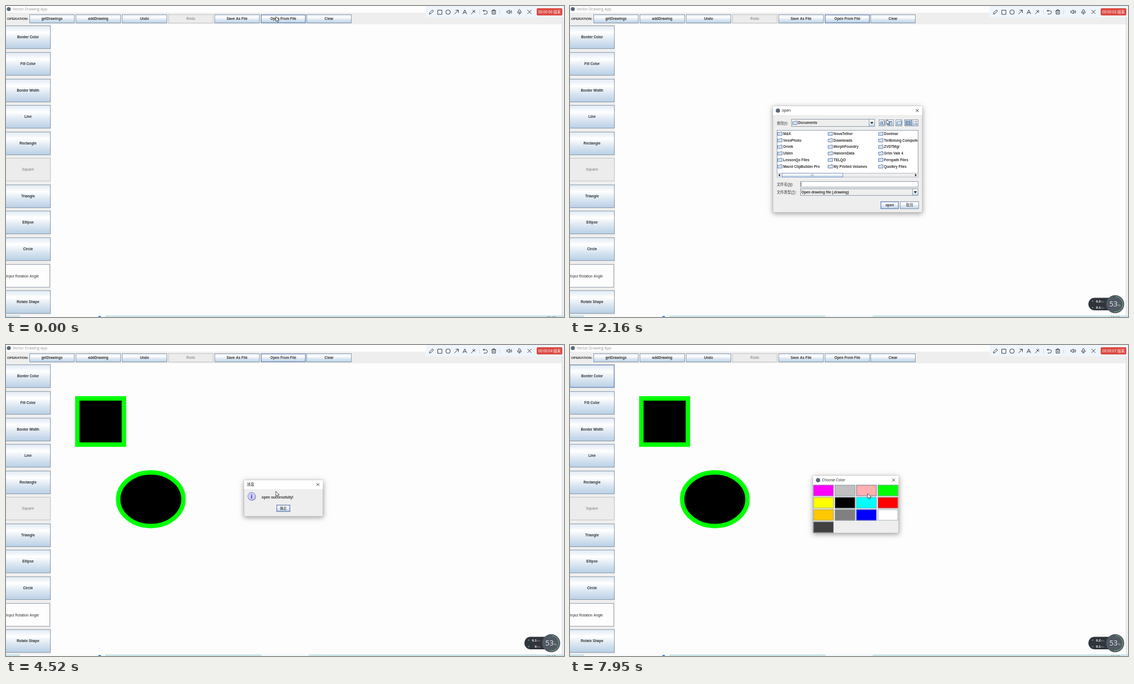
These frames come from a looping animation (1001 by 559 pixels, 8 s). An HTML page with a canvas:

```html
<!DOCTYPE html>
<html lang="en">
<head>
<meta charset="utf-8">
<title>Vector Drawing App</title>
<style>
html, body { margin: 0; width: 100%; height: 100%; overflow: hidden; background: #fdfdfd; }
canvas { display: block; }
</style>
</head>
<body>
<canvas id="stage" width="1001" height="559"></canvas>
<script>
const g = document.getElementById('stage').getContext('2d');
const LOOP = 8000;
const SANS = '"Liberation Sans","Noto Sans CJK SC","Noto Sans CJK",sans-serif';
const UI = '"Open Sans","Noto Sans CJK SC","Noto Sans CJK",sans-serif';
const PANEL = '#eeeeee', EDGE = '#7a8a99', BLUE = '#6382bf', INK = '#333';

const DOCUMENTS = [
  ['M&K', 'VexoPhoto', 'Orvek', 'Ublen', 'LessonQo Files', 'Mavol ClipBuilder Pro'],
  ['NovaTether', 'Downloads', 'MorphFoundry', 'HalvornData', 'TELQO', 'My Printed Volumes'],
  ['Dovimar', 'TerBolung Compute', 'ZVDTMgr', 'Grim Vale 4', 'Fernpath Files', 'Quolbry Files']
];
const DESKTOP = [
  ['KVT云盘', 'NubTrunk', 'felvo', '此电脑', '库', '网络', '00000'],
  ['mygitrepo - 快捷方式', '文档', '20231126095810.drawing', '20231126100347.drawing']
];
const SWATCHES = ['#f0f', '#c0c0c0', '#ffafaf', '#0f0', '#ff0', '#000', '#0ff',
  '#f00', '#ffc800', '#808080', '#00f', '#fff', '#404040'];

// Pointer path: time, x, y
const POINTER = [
  [0, 484, 19], [1750, 484, 19], [2150, 568, 204], [2350, 570, 206], [2640, 571, 206],
  [3260, 500, 284], [3480, 498, 265], [3620, 484, 263], [4720, 484, 263], [5000, 496, 290],
  [5250, 496, 290], [5600, 340, 222], [5840, 159, 138], [6020, 159, 138], [6400, 42, 55],
  [6950, 42, 55], [7640, 577, 256], [7720, 574, 258], [7940, 534, 267], [8000, 534, 267]
];
const SECONDS = [1000, 2000, 3340, 4300, 5000, 5700, 6700];
const SPEEDS = [[0, '0.1', '0.1'], [2000, '0.2', '0.1'], [3100, '0.1', '0.3'],
  [3760, '0.1', '0'], [5000, '0.2', '0.1']];

const clamp = v => Math.max(0, Math.min(1, v));
const easeOut = v => 1 - (1 - v) ** 2;

function rect(x, y, w, h, fill, edge) {
  g.fillStyle = fill;
  g.fillRect(x, y, w, h);
  if (edge) {
    g.strokeStyle = edge;
    g.lineWidth = .8;
    g.strokeRect(x + .5, y + .5, w - 1, h - 1);
  }
}

function text(s, x, y, { size = 6.35, bold = true, font = SANS, color = INK, align = 'left' } = {}) {
  g.font = `${bold ? 'bold ' : ''}${size}px ${font}`;
  g.fillStyle = color;
  g.textAlign = align;
  g.fillText(s, x, y);
}

function disc(x, y, r, fill) {
  g.beginPath();
  g.arc(x, y, r, 0, 7);
  g.fillStyle = fill;
  g.fill();
}

function line(d, color = '#333', width = 1) {
  g.strokeStyle = color;
  g.lineWidth = width;
  g.stroke(new Path2D(d));
}

function shape(d, color) {
  g.fillStyle = color;
  g.fill(new Path2D(d));
}

function metal(y, h) {
  const grad = g.createLinearGradient(0, y, 0, y + h);
  [[0, '#dde8f3'], [.3, '#fff'], [.6, '#dde8f3'], [1, '#b8cfe5']]
    .forEach(([at, color]) => grad.addColorStop(at, color));
  return grad;
}

function button(label, x, y, w, h, { off, hot, focus, bold = true } = {}) {
  rect(x, y, w, h, off ? '#ececec' : metal(y, h), off ? '#bcbcbc' : EDGE);
  if (hot) {
    g.strokeStyle = BLUE;
    g.strokeRect(x + 1, y + 1, w - 2, h - 2);
  }
  const mid = x + w / 2;
  text(label, mid, y + h / 2 + 2.3, { color: off ? '#999' : INK, align: 'center', bold });
  if (focus) {
    const half = g.measureText(label).width / 2 + 1;
    g.strokeStyle = '#a9bdd6';
    g.lineWidth = .6;
    g.strokeRect(mid - half, y + 4, half * 2, h - 8);
  }
}

function mainWindow(t) {
  const active = t >= 5250 && t < 6550;
  rect(0, 0, 1001, 559, '#fdfdfd');
  disc(5, 5.5, 3.6, '#596675');
  text('Vector Drawing App', 12, 8.3, { size: 6.75, bold: false, font: UI, color: active ? '#111' : '#999' });
  rect(0, 12, 998, 21, PANEL);
  rect(0, 33, 81, 523, PANEL);
  text('OPERATION:', 2, 25, { size: 6.2 });

  ['getDrawings', 'addDrawing', 'Undo', 'Redo', 'Save As File', 'Open From File', 'Clear']
    .forEach((label, i) => button(label, Math.round(42 + i * 82.9), 15, 81, 16, {
      off: i === 3, hot: i === 5 && t < 5250, focus: i === 5 && active
    }));

  ['Border Color', 'Fill Color', 'Border Width', 'Line', 'Rectangle', 'Square', 'Triangle',
    'Ellipse', 'Circle', '', 'Rotate Shape'].forEach((label, i) => {
    const y = Math.round(35.4 + i * 47.57);
    if (label) button(label, -1, y, 81, 42, { off: i === 5, hot: i === 0 && t > 6350 });
    else {
      rect(-1, y, 80, 42, '#fdfdfd', EDGE);
      text('Input Rotation Angle', 0, y + 23.5, { size: 6.5, bold: false });
    }
  });

  rect(997, 20, 1, 536, '#d4d9df');
  rect(998, 20, 3, 536, '#eef0f3');
  rect(0, 556, 1001, 3, '#cce6ea');
  rect(25, 556, 153, 3, '#fafcfc');
  if (t >= 1000) rect(458, 556, 85, 3, '#f0f7f8');
  disc(168, 560, 3, '#2583d8');
  text('10:10', 970, 563, { size: 6.5, bold: false });
}

function drawing() {
  g.strokeStyle = '#0f0';
  g.fillStyle = '#000';
  g.lineWidth = 8;
  g.beginPath();
  g.rect(128, 96, 83.5, 83);
  g.fill();
  g.stroke();
  g.beginPath();
  g.ellipse(259.8, 277.2, 58.6, 48.2, 0, 0, 7);
  g.fill();
  g.stroke();
}

function recorder(t) {
  rect(753, 0, 248, 20.5, '#eff5fc');
  [
    'M759.5 14.5l.7-2.7 4.8-4.8 2 2-4.8 4.8z', 'M774.5 7.5h7.5v7.5h-7.5z',
    'M789 11a4 4 0 1 0 8 0a4 4 0 1 0-8 0', 'M804.5 14.5l7-7M806.5 7.5h5v5',
    'M819.5 14.5l3.5-7.5l3.5 7.5M820.8 12h4.4', 'M834.5 14.5l5.5-5.5M836.5 8l5 4M839 7l3 2.5',
    'M856 8.5h4.5a3 3 0 0 1 0 6h-3.5M858 6.5l-2 2l2 2',
    'M871 8.5h8M873.5 8.3v-1.5h3v1.5M872 8.5v6h6v-6M874 10.5v2.2M876 10.5v2.2',
    'M898.5 9h2l2.5-2v7l-2.5-2h-2zM904.5 9q1.3 1.5 0 3.2M906 7.5q2.5 3 0 6',
    'M919.3 7.5q1.7-2.5 3.4 0v3q-1.7 2.5-3.4 0zM917.3 10q0 3.5 3.7 3.5t3.7-3.5M921 13.5v2',
    'M935.5 7l7 7M942.5 7l-7 7'
  ].forEach(d => line(d, '#303338', .95));
  line('M849.5 7v8M885.5 7v8', '#cbd2dc', .8);
  g.beginPath();
  g.roundRect(952, 4, 46, 13, 2);
  g.fillStyle = '#dc4b43';
  g.fill();
  const sec = SECONDS.filter(s => t >= s).length;
  text(`00:00:0${sec} 结束`, 975, 13, { size: 6.5, bold: false, color: '#fff', align: 'center' });
}

function monitor(t) {
  const [, up, down] = SPEEDS.filter(s => t >= s[0]).pop();
  g.beginPath();
  g.roundRect(930, 524.5, 50, 22.5, 11);
  g.fillStyle = '#30343b';
  g.fill();
  [[up, 530.5, '#5fa8d8'], [down, 542, '#56b884']].forEach(([value, y, color]) => {
    disc(937.5, y, 1.1, color);
    text(value, 952, y + 2.3, { size: 6.2, color: '#fff', align: 'right' });
    text('K/s', 952.5, y + 2, { size: 4.2, bold: false, color: '#a2a8af' });
  });
  disc(978, 536, 16.2, '#515963');
  g.beginPath();
  g.arc(978, 536, 13.8, -1.5, 1.75);
  g.strokeStyle = '#69b98b';
  g.lineWidth = 1;
  g.stroke();
  text(t < 2000 ? '52' : '53', 967.5, 540.2, { size: 13, bold: false, font: UI, color: '#e9edf0' });
  text('%', 983, 540, { size: 5, bold: false, color: '#c0c7cd' });
}

// A window that zooms and fades in, then out.
function popup(t, from, to, [x, y, w, h], title, icon, body) {
  if (t < from || t > to + 130) return;
  const shown = easeOut(clamp((t - from) / 200)) * (1 - clamp((t - to) / 130));
  const cx = x + w / 2, cy = y + h / 2, scale = .96 + .04 * shown;
  g.save();
  g.globalAlpha = shown;
  g.translate(cx, cy);
  g.scale(scale, scale);
  g.translate(-cx, -cy);
  g.shadowColor = 'rgba(0,0,0,.4)';
  g.shadowBlur = 9;
  g.shadowOffsetY = 2;
  rect(x, y, w, h, PANEL);
  g.shadowColor = 'transparent';
  g.strokeStyle = '#b2b2b2';
  g.lineWidth = .6;
  g.strokeRect(x, y, w, h);
  rect(x, y, w, 16, '#fff');
  if (icon) disc(x + 9, y + 8, 3.8, '#596675');
  text(title, x + (icon ? 16 : 5), y + 10.3, { size: 6.7, bold: false, font: UI, color: '#111' });
  line(`M${x + w - 11.5} ${y + 5.3}l5 5m0-5l-5 5`, '#222', .9);
  body();
  g.restore();
}

function folder(x, y, edge = '#536f9e') {
  shape(`M${x} ${y + 1}h4l1-1h3.5v7h-8.5z`, '#d5e3f3');
  line(`M${x + .5} ${y + 1.5}h4l1-1h3v6h-8z`, edge, .8);
}

function combo(value, x, y, w, h, inset) {
  rect(x, y, w, h, PANEL, EDGE);
  rect(x + w - 11, y, 11, h, metal(y, h), EDGE);
  shape(`M${x + w - 8.5} ${y + h / 2 - 1.5}h6l-3 3.5z`, '#222');
  text(value, x + inset, y + h / 2 + 2.3);
}

function fileList(columns, t) {
  columns.forEach((names, col) => names.forEach((name, row) => {
    const x = 371.5 + col * 90.5, y = 229.5 + row * 11.75, isFile = name.endsWith('.drawing');
    if (isFile) {
      shape(`M${x + 1} ${y - 4}h4l2 2v6h-6z`, '#f7faff');
      line(`M${x + 1.5} ${y - 3.5}h3.5l2 2v5.5h-5.5z`, '#6a7890', .8);
      if (row === 3 && t > 3960) rect(x + 10, y - 5, 81, 10, '#b8cfe5');
    } else folder(x + .5, y - 3.5);
    text(name, x + 10.8, y + 2.4);
  }));
}

function openDialog(t) {
  const desktop = t >= 2530;
  text('查找(I):', 371, 212.5, { bold: false });
  combo(desktop ? 'Desktop' : 'Documents', 397, 203, 150, 14, 12);
  folder(399, 206.5);

  [554, 569, 584].forEach((x, i) => {
    const off = desktop && i === 0;
    const pressed = i === 1 && t >= 2350 && t < 2500;
    rect(x, 204, 12, 12, off ? PANEL : pressed ? '#b8cfe5' : metal(204, 12), off ? '#c0c0c0' : EDGE);
    if (i === 1) line('M571.5 208.5l1-1h5l1 1zM572.5 208.5h5v4.5h-5z', BLUE, .9);
    else folder(x + 2, 206.5, off ? '#bbb' : undefined);
    if (i === 0) line('M560 212.5v-3m-1.5 1.3l1.5-1.5l1.5 1.5', off ? '#bbb' : '#334', .8);
  });
  rect(600, 204, 13, 12, '#b8cfe5', EDGE);
  rect(613, 204, 12, 12, metal(204, 12), EDGE);
  line('M602.5 207.5h3v2h-3zM607.5 207.5h3v2h-3zM602.5 211.5h3v2h-3zM607.5 211.5h3v2h-3z', '#40587f', .8);
  line('M615 208h2m1.5 0h4.5M615 212h2m1.5 0h4.5', '#40587f', 1.2);

  rect(371, 223, 254, 85, '#fff', EDGE);
  g.save();
  g.beginPath();
  g.rect(371, 223, 253.5, 85);
  g.clip();
  fileList(desktop ? DESKTOP : DOCUMENTS, t);
  if (!desktop) {
    rect(371, 300, 254, 8, PANEL, '#aab4c0');
    rect(380, 300, 110, 8, metal(300, 8), BLUE);
    line('M432.5 302.5v3m2-3v3m2-3v3', BLUE, .7);
    shape('M376.8 301.5v5l-3-2.5zM619 301.5v5l3-2.5z', '#222');
  }
  g.restore();

  text('文件名(N):', 371, 322.8, { bold: false });
  rect(413, 315, 212, 11, '#fff', EDGE);
  if (t > 3960) text('20231126100347.drawing', 415, 322.8, { bold: false });
  else if (!desktop) line('M414.8 317v7', '#333', .7);
  text('文件类型(T):', 371, 337.2, { bold: false });
  line('M391.5 324h5M397.5 338.3h5', INK, .6);
  combo('Open drawing file (.drawing)', 413, 328, 212, 13, 2);
  button('open', 557, 351, 33, 14, { hot: true });
  button('取消', 592, 351, 34, 14, { bold: false });
}

function messageDialog() {
  disc(441.3, 272.8, 7.3, '#aaa9bd');
  disc(440.5, 271.8, 7.2, '#8580d0');
  disc(440.5, 271.8, 6.4, '#d0cffb');
  text('i', 440.5, 275.6, { size: 11, color: '#39357f', align: 'center' });
  text('open successfully!', 458.5, 275.8);
  button('确定', 485, 287, 25, 13, { hot: true, bold: false });
}

function colorDialog(t) {
  const hovered = t > 7820 ? 2 : t > 7600 ? 3 : -1;
  SWATCHES.forEach((color, i) => {
    const x = 436.5 + i % 4 * 38.5, y = 251.5 + (i >> 2) * 22;
    rect(x, y, 36.5, 20, color, i === hovered ? '#53779f' : '#8a98a6');
  });
}

function pointer(t) {
  const i = POINTER.findIndex(p => p[0] > t);
  const [t0, x0, y0] = POINTER[i - 1], [t1, x1, y1] = POINTER[i];
  const k = clamp((t - t0) / (t1 - t0)), e = k * k * (3 - 2 * k);
  g.save();
  g.translate(x0 + (x1 - x0) * e, y0 + (y1 - y0) * e);
  const arrow = 'M0 0v8.8l2-1.9l1.4 3.3l1.5-.7l-1.4-3.1h2.8z';
  shape(arrow, '#fff');
  line(arrow, '#222', .75);
  g.restore();
}

function draw(t) {
  mainWindow(t);
  if (t >= 4180) drawing();
  popup(t, 1000, 4100, [364, 180, 268, 191], 'open', true, () => openDialog(t));
  popup(t, 4220, 5200, [427, 243, 141.5, 65], '消息', false, messageDialog);
  popup(t, 6550, LOOP, [436, 235, 153.5, 103], 'Choose Color', true, () => colorDialog(t));
  recorder(t);
  if (t >= 900) monitor(t);
  pointer(t);
}

function tick() {
  draw(performance.now() % LOOP);
  requestAnimationFrame(tick);
}
tick();
</script>
</body>
</html>
```
